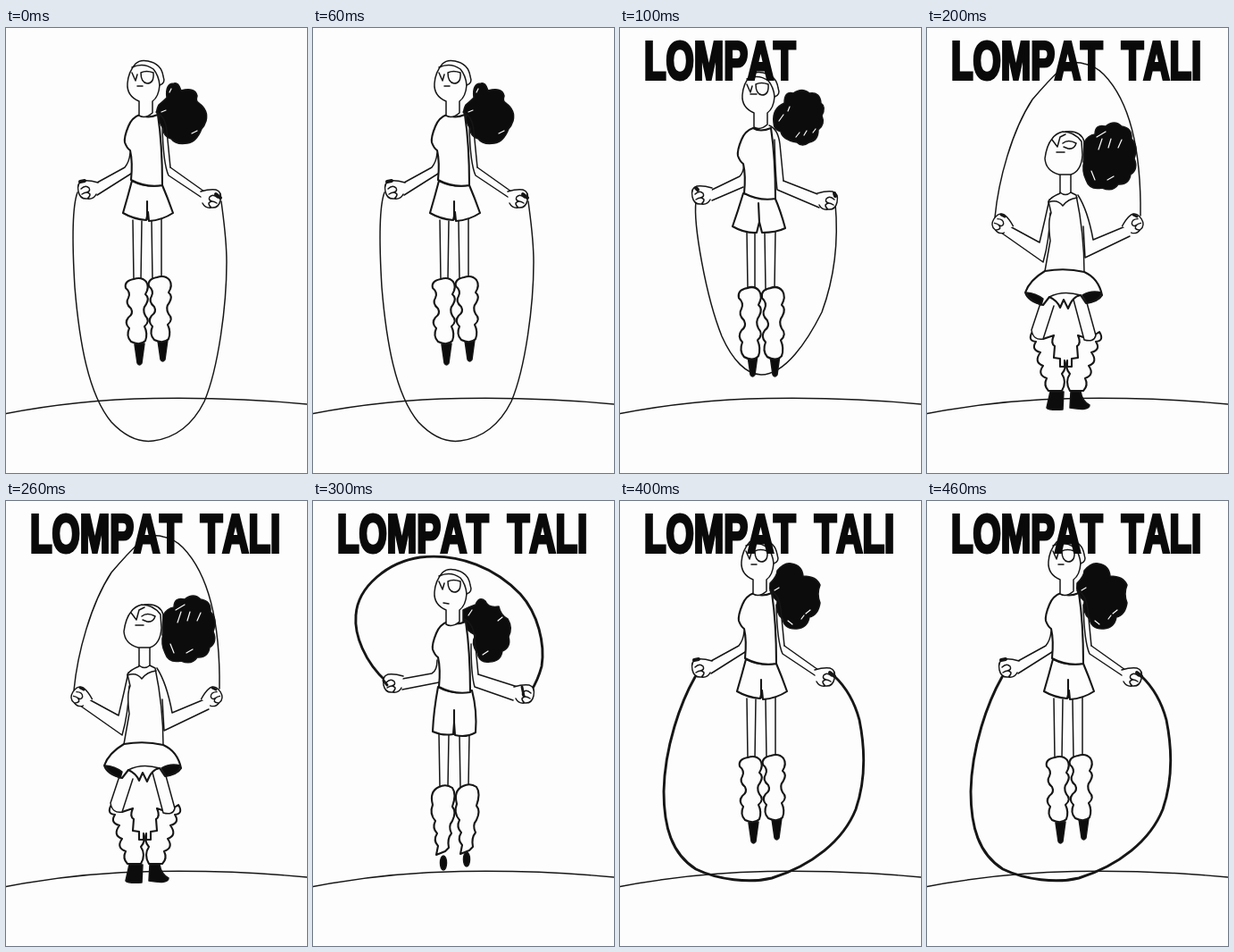
An HTML page that plays this animation: 337x498 px, repeating every 500 ms.

```html
<!DOCTYPE html>
<html lang="id">
<head>
<meta charset="utf-8">
<title>Lompat tali</title>
<style>
  html, body { margin: 0; width: 100%; height: 100%; overflow: hidden; background: #fdfdfd; }
  svg { display: block; width: 100vw; height: 100vh; }
  path, ellipse { fill: none; stroke: #161616; stroke-width: 1.5; stroke-linecap: round; stroke-linejoin: round; }
  .skin { fill: #fdfdfd; }
  .ink { fill: #0c0c0c; }
  .firm { stroke-width: 2.1; }
  .bold { stroke-width: 2.9; }
  .knob { stroke-width: 4; }
  .shine { stroke: #fdfdfd; stroke-width: 1.2; }
  .pose { visibility: hidden; }
  text {
    font: bold 60px "Liberation Sans", Arial, sans-serif;
    font-kerning: none; word-spacing: 15px;
    fill: #0a0a0a; stroke: #0a0a0a; stroke-width: 4;
  }
</style>
</head>
<body>
<svg viewBox="0 0 337 498">
  <defs>
    <g id="head">
      <path class="skin" d="M146 40Q138 49 137 62Q136 76 150 82L150 98Q157 102 165 95L165 82Q172 77 173 64Q180 62 177 54Q175 40 160 37Q151 35 146 40Z"/>
      <path d="M142 44Q155 38 166 46Q172 53 173 64M152 50Q158 47 166 50Q167 62 159 62Q152 61 152 50M142 50L146 59L148 52"/>
    </g>
    <g id="torso">
      <path class="skin firm" d="M150 97Q141 100 137 110Q132 122 133 128Q135 134 139 137Q142 150 140 170Q157 179 175 176Q175 130 170 97Q158 102 150 97Z"/>
      <path d="M168 94Q178 98 180 115L184 156"/>
    </g>
    <path id="fist" class="skin" d="M12 -8Q2 -11 -5 -10Q-12 -8 -10 2Q-8 11 0 10Q7 11 10 5M-7 -1Q-2 -6 2 -2Q4 2 -1 3M-6 5Q0 1 3 5Q3 8 0 10"/>
    <path id="foot" class="ink" d="M144 354L155 353L152 375Q149 379 147 375Z"/>
    <path id="boot" class="skin firm" d="M143 281Q132 283 134 291Q140 296 137 302Q133 308 140 314Q143 320 137 324Q132 330 138 336Q134 345 140 351Q150 356 156 350Q159 342 155 334Q162 328 156 322Q152 315 157 309Q161 302 156 298Q161 290 157 284Q152 278 143 281Z"/>
    <path id="tatters" class="skin firm" d="M141 320Q130 325 134 340Q130 350 137 358Q133 366 139 372Q134 380 140 386L138 396L148 392L152 388Q150 378 155 372Q151 364 156 358Q161 348 156 342Q161 328 156 321Q149 316 141 320Z"/>
    <path id="puff" class="skin firm" d="M118 340Q112 350 122 351Q116 360 127 363Q119 374 130 378Q123 388 134 392Q130 400 136 406L151 406Q157 396 151 387Q157 380 154 372L154 379L149 379L149 370L142 369L143 356Q138 353 142 344L130 348Z"/>
    <g id="leap">
      <use href="#foot"/>
      <use href="#foot" x="26" y="-4"/>
      <path d="M142 215L143 282Q147 286 151 282L152 216M163 216L164 282Q169 286 174 281L174 213"/>
      <use href="#boot"/>
      <use href="#boot" x="26" y="-2"/>
      <path d="M139 140Q138 150 133 156L102 173M140 163L102 187M184 156L222 183M175 110Q176 152 182 165L218 189"/>
      <path class="skin firm" d="M141 171Q136 190 131 207Q143 214 157 215L159 206L160 216Q175 215 187 207Q181 190 175 176Q157 179 141 171M158 194L158 214"/>
      <use href="#torso"/>
      <use href="#head" x="-1"/>
      <path d="M147 65L153 65"/>
      <use href="#fist" x="91" y="181"/>
      <use href="#fist" transform="translate(230 191) scale(-1 1)"/>
      <path class="knob" d="M83 172L88 171M235 186L240 190"/>
    </g>
  </defs>

  <path d="M0 431.5Q80 416 165 414.5Q255 413 337 421"/>

  <g class="pose">
    <path d="M80 184C74 200 74 240 77 290C82 350 92 410 118 441C135 459 150 464 165 462C195 458 212 438 222 418C238 380 247 310 247 262C247 235 243 210 241 194"/>
    <path class="ink" d="M171 86Q176 82 180 78Q178 62 188 62Q193 60 196 70Q212 66 214 76Q212 82 216 84Q227 92 224 104Q222 110 219 113Q213 128 203 129Q190 131 185 124Q176 122 176 112Q170 105 172 98Q166 96 171 86Z"/>
    <path class="shine" d="M174 94L179 92M208 118L214 115M183 72L185 68"/>
    <use href="#leap"/>
  </g>

  <g class="pose">
    <path d="M85 194C82 220 96 300 114 345C126 372 142 388 158 388C185 388 210 350 226 318C240 280 245 240 241 196"/>
    <path class="ink" d="M172 106Q170 90 184 84Q184 70 194 73Q204 66 212 73Q224 71 225 84Q231 88 226 98Q230 108 222 114Q222 126 212 128Q204 134 198 128Q182 125 180 116Q172 114 172 106Z"/>
    <path class="shine" d="M178 104L183 97M188 93L190 88M197 122L201 117M206 120L209 115M216 117L219 113"/>
    <use href="#foot" x="-1" y="13"/>
    <use href="#foot" x="24" y="13"/>
    <path d="M142 228L143 292Q147 296 151 292L151 229M162 229L163 292Q168 296 173 291L174 227"/>
    <use href="#boot" transform="translate(-1 -18) scale(1 1.1)"/>
    <use href="#boot" transform="translate(25 -18) scale(1 1.1)"/>
    <path d="M139 153Q138 162 134 166L103 181M138 178L103 193M183 171L224 187M173 125Q174 165 176 181L223 201"/>
    <path class="skin firm" d="M138 185Q132 205 126 222Q140 230 153 229L156 217L159 229Q175 229 185 224Q180 205 173 189Q155 190 138 185M155 196L156 218"/>
    <use href="#torso" x="-1" y="15"/>
    <use href="#head" x="0" y="13"/>
    <path d="M146 74L153 74"/>
    <use href="#fist" x="91" y="187"/>
    <use href="#fist" transform="translate(233 193) scale(-1 1)"/>
    <path class="knob" d="M85 179L87 181M240 185L241 188"/>
  </g>

  <g class="pose">
    <path d="M76 212C80 170 95 115 118 80C130 66 140 55 150 46Q162 36 176 40Q188 42 198 52C225 80 240 130 239 210"/>
    <path class="ink" d="M176 128Q180 120 188 119Q188 107 200 110Q210 102 218 110Q230 112 229 124Q237 132 232 146Q237 158 228 164Q226 176 214 175Q208 184 196 179Q182 182 178 170Q173 160 176 148Z"/>
    <path class="shine" d="M190 122L200 116M192 136L196 124M203 134L206 124M214 134L218 125M184 160L188 170M202 170L209 166"/>
    <path d="M137 192Q132 215 126 240L91 221M138 207Q137 238 130 262L83 229M169 187Q180 204 186 237L222 222M175 222L177 257L227 233"/>
    <path class="skin" d="M149 164L149 185Q139 189 136 194L139 207Q135 216 138 238L132 272Q155 270 176 273Q176 230 167 187L161 184L161 162"/>
    <path d="M149 184Q155 189 161 184M136 195Q146 191 152 199Q158 191 168 190"/>
    <path class="skin" d="M140 124Q134 131 132 146Q133 160 148 164L161 164Q173 160 174 142L173 127Q165 116 152 116Q144 118 140 124Z"/>
    <path d="M140 125L146 133L149 122L155 119M152 129Q158 124 167 129Q165 136 158 135L153 133M145 139L154 139M155 116Q172 114 176 127L175 150"/>
    <use href="#puff"/>
    <use href="#puff" transform="translate(311 0) scale(-1 1)"/>
    <path class="skin" d="M128 305L117 338Q119 350 130 348L142 311M164 304L176 349Q187 352 189 344L178 304"/>
    <path class="skin firm" d="M132 272Q115 282 110 296Q113 306 130 310L137 301Q146 305 149 313L153 304L158 314Q163 300 172 299L178 308Q192 306 196 299Q192 280 176 273Q155 268 132 272Z"/>
    <path class="ink" d="M111 296Q122 297 130 303L128 310Q116 306 111 296ZM174 299Q184 293 195 296Q194 305 179 308Z"/>
    <path d="M137 301Q152 293 172 299"/>
    <path class="ink" d="M138 407L134 425Q136 428 152 427L153 407ZM161 407L160 425Q182 429 182 422Q174 418 172 407Z"/>
    <use href="#fist" transform="translate(83 219) rotate(45) scale(.95)"/>
    <use href="#fist" transform="translate(232 219) scale(-.95 .95) rotate(45)"/>
    <path class="bold" d="M83 209L87 211M231 209L235 211"/>
  </g>

  <g class="pose">
    <path class="bold" d="M82 202C58 180 46 150 48 128C50 95 85 68 120 63C165 58 205 76 232 104C252 126 260 160 256 185Q252 200 244 213"/>
    <path class="ink" d="M168 122Q176 118 182 116Q186 106 193 112Q196 120 208 118Q210 128 218 132Q224 142 219 152Q222 164 212 168Q210 180 198 180Q186 182 184 170Q176 160 182 150Q172 146 168 136Z"/>
    <path class="shine" d="M174 128L178 122M207 134L212 130M190 172L196 168"/>
    <ellipse class="ink" cx="146" cy="405" rx="3.5" ry="8"/>
    <ellipse class="ink" cx="172" cy="401" rx="3.5" ry="8"/>
    <path d="M141 261L142 320Q147 324 151 320L152 262M164 262L165 320Q169 323 174 319L175 261"/>
    <use href="#tatters"/>
    <use href="#tatters" x="27" y="-1"/>
    <path d="M139 178Q139 190 133 193L100 199M141 203L100 211M185 194L229 208M177 160Q177 195 181 208L224 223"/>
    <path class="skin firm" d="M140 208Q135 235 134 258Q145 263 157 261L158 248L159 262Q172 265 182 259Q184 235 178 212Q158 218 140 208M158 234L158 261"/>
    <use href="#torso" x="1" y="38"/>
    <use href="#head" x="-1" y="40"/>
    <path d="M146 114L152 115"/>
    <use href="#fist" x="89" y="204"/>
    <use href="#fist" transform="translate(237 216) scale(-1 1)"/>
    <path class="bold" d="M79 201L83 206M234 208L236 218"/>
  </g>

  <g class="pose">
    <path class="bold" d="M84 197C68 225 50 275 49 325C49 365 58 395 85 412C110 424 145 428 170 422C215 408 250 380 264 345C276 310 274 275 268 245Q260 215 240 196"/>
    <path class="ink" d="M168 92Q176 84 176 78Q184 68 192 70Q204 72 205 84Q220 84 224 94Q220 104 224 114Q222 128 212 130Q210 142 198 143Q184 144 182 132Q174 126 176 112Q166 104 168 92Z"/>
    <path class="shine" d="M173 100L178 97M208 126L213 122M188 134L193 138M203 132L206 128"/>
    <use href="#leap" y="6"/>
  </g>

  <text transform="translate(27 56.5) scale(.67 1)"></text>
</svg>
<script>
  const poses = document.querySelectorAll('.pose');
  const caption = document.querySelector('text');
  const words = ['', 'LOMPAT', 'LOMPAT TALI'];
  const STEP = 100;

  function draw() {
    const now = Math.floor(performance.now() / STEP) % poses.length;
    poses.forEach((pose, i) => pose.style.visibility = i === now ? 'visible' : 'hidden');
    caption.textContent = words[Math.min(now, 2)];
    requestAnimationFrame(draw);
  }
  draw();
</script>
</body>
</html>
```
